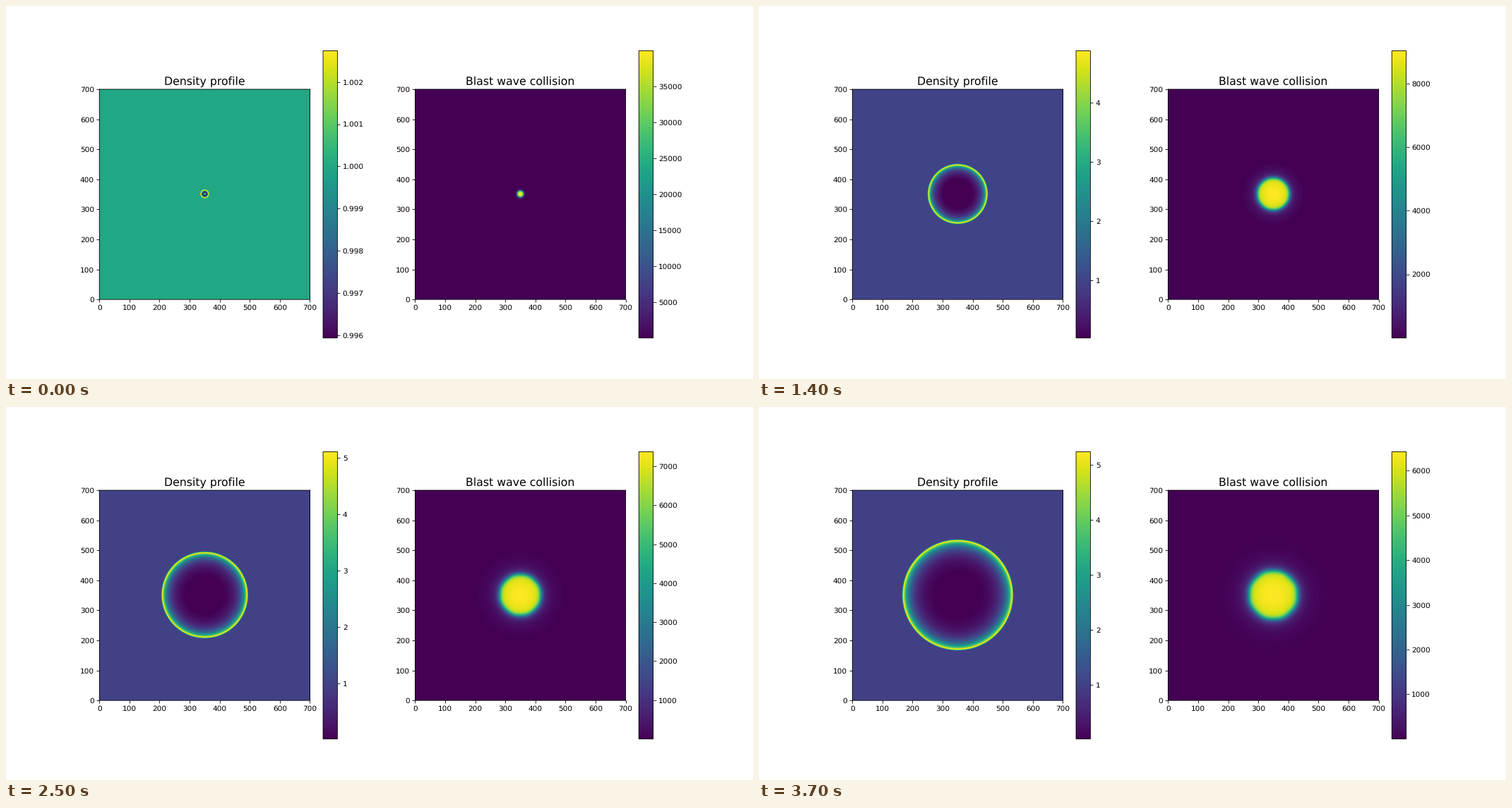
A matplotlib script that plays this animation: 1058 px wide and 529 px high, repeating every 3.75 s.

```python
import numpy as np
import matplotlib.pyplot as plt
from matplotlib.animation import FuncAnimation
from matplotlib.ticker import MaxNLocator

plt.rcParams.update({
    "font.family": "DejaVu Sans",
    "text.hinting": "none",
    "path.snap": False,
})

FRAMES, INTERVAL, SIZE = 75, 50, 700
DPI = 1058 / 14

axis = np.arange(SIZE) + 0.5 - SIZE / 2
X, Y = np.meshgrid(axis, axis)
RADIUS = np.hypot(X, Y)
FACETS = np.cos(8 * np.arctan2(Y, X))
LOCATOR = MaxNLocator(nbins=9, steps=[1, 2, 2.5, 5, 10])


def growth(n, start, rate, power):
    """Power-law radius that begins at the size of the initial charge."""
    return (start**3 + (rate * n**power) ** 3) ** (1 / 3)


def decay(n, start, scale, power):
    return start * (1 + n / scale) ** -power


def falloff(r, edge, width):
    """Smooth step: 1 inside the edge, 0 outside."""
    return 1 / (1 + np.exp(np.clip((r - edge) / width, -50, 50)))


def bump(r, centre, width):
    return np.exp(-((r - centre) / width) ** 2)


def fields(n):
    """Density and heat at step n, each with its colour limits."""
    shock = growth(n, 14, 12.2, 0.63)
    core = growth(n, 11, 12.5, 0.43)
    low = decay(n, 0.99593, 0.315, 0.82)
    high = 6 - decay(n, 4.99726, 0.75, 0.409)
    heat_max = decay(n, 39962, 0.42, 0.353)

    inside = falloff(RADIUS, shock - 0.4, 0.6)
    rim = core * (1 - 0.008 * FACETS * n / FRAMES)
    hot = falloff(RADIUS, rim, max(1.5, 0.06 * core))

    if n == 0:
        density = 1 + (low - 1) * bump(RADIUS, 7, 2.7) + (high - 1) * bump(RADIUS, 12.2, 2.3)
        halo = 0
    else:
        x = np.minimum(RADIUS / (shock - 3.5), 1)
        shell = low + (high - low) * (x**16 + x**5) / 2 * (1 - hot)
        density = 1 + (shell - 1) * inside
        halo = 0.28 * (core / np.maximum(RADIUS, core)) ** 5 * inside

    dome = 1 - 0.08 * np.minimum(RADIUS / core, 1.5) ** 2
    heat = heat_max * (hot * dome + (1 - hot) * halo)
    return (density, low, high), (heat, 0, heat_max)


def make_panel(ax, title):
    image = ax.imshow(np.zeros((SIZE, SIZE)), origin="lower", cmap="viridis",
                      extent=(0, SIZE, 0, SIZE), vmin=0, vmax=1)
    ax.set_title(title, fontsize=15)
    ticks = range(0, SIZE + 1, 100)
    ax.set_xticks(ticks)
    ax.set_yticks(ticks)
    return image, fig.colorbar(image, ax=ax)


def update(n):
    for (image, bar), (data, low, high) in zip(panels, fields(n)):
        image.set_data(data)
        image.set_clim(low, high)
        bar.set_ticks([t for t in LOCATOR.tick_values(low, high) if low < t <= high])
    return [image for image, _ in panels]


fig, axes = plt.subplots(1, 2, figsize=(1058 / DPI, 529 / DPI), dpi=DPI)
fig.subplots_adjust(left=0.125, right=0.9, bottom=0.11, top=0.88, wspace=0.2)
panels = [make_panel(ax, title)
          for ax, title in zip(axes, ("Density profile", "Blast wave collision"))]

animation = FuncAnimation(fig, update, frames=FRAMES, interval=INTERVAL,
                          repeat=True, repeat_delay=0, blit=False)
plt.show()
```
